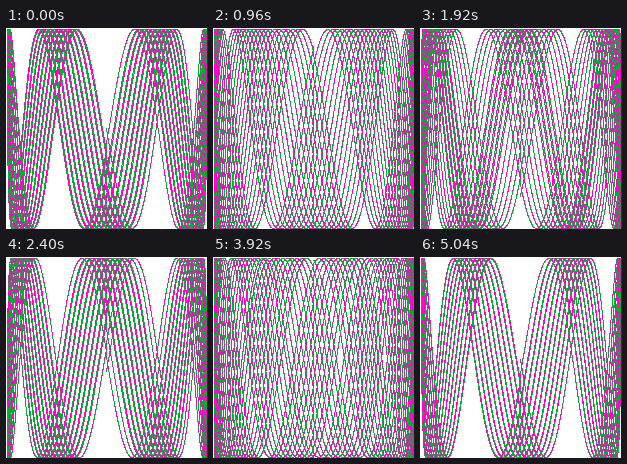
An HTML page with a canvas for the animation above (5.12 s loop, 201x201 px).

```html
<!DOCTYPE html>
<html lang="en">
<head>
<meta charset="utf-8">
<title>Lissajous</title>
<style>
  html, body { margin: 0; width: 100%; height: 100%; overflow: hidden; background: #fff; }
  canvas { display: block; width: 201px; height: 201px; image-rendering: pixelated; }
</style>
</head>
<body>
<canvas id="stage" width="201" height="201"></canvas>
<script>
const RADIUS = 100, SIZE = 2 * RADIUS + 1;
const CYCLES = 10, STEP = 0.001, FREQUENCY = 6.046602879796196;
const FRAMES = 64, FRAME_MS = 80, PHASE_STEP = 0.1;

// Packed as ABGR
const WHITE = 0xffffffff, GREEN = 0xff32b400, MAGENTA = 0xffc800ff;

const ctx = document.getElementById('stage').getContext('2d');
const image = ctx.createImageData(SIZE, SIZE);
const pixels = new Uint32Array(image.data.buffer);

const toPixel = v => RADIUS + Math.trunc(v * RADIUS + 0.5);

// Successive points along the curve alternate in colour.
function drawFrame(index) {
  let phase = 0;
  for (let i = 0; i < index; i++) phase += PHASE_STEP;
  pixels.fill(WHITE);
  let even = true;
  for (let t = 0; t < CYCLES * 2 * Math.PI; t += STEP) {
    const x = toPixel(Math.sin(t));
    const y = toPixel(Math.sin(t * FREQUENCY + phase));
    pixels[y * SIZE + x] = even ? GREEN : MAGENTA;
    even = !even;
  }
  ctx.putImageData(image, 0, 0);
}

const start = performance.now();
let shown = -1;

function tick() {
  const index = Math.floor((performance.now() - start) / FRAME_MS) % FRAMES;
  if (index !== shown) drawFrame(shown = index);
  requestAnimationFrame(tick);
}
tick();
</script>
</body>
</html>
```
